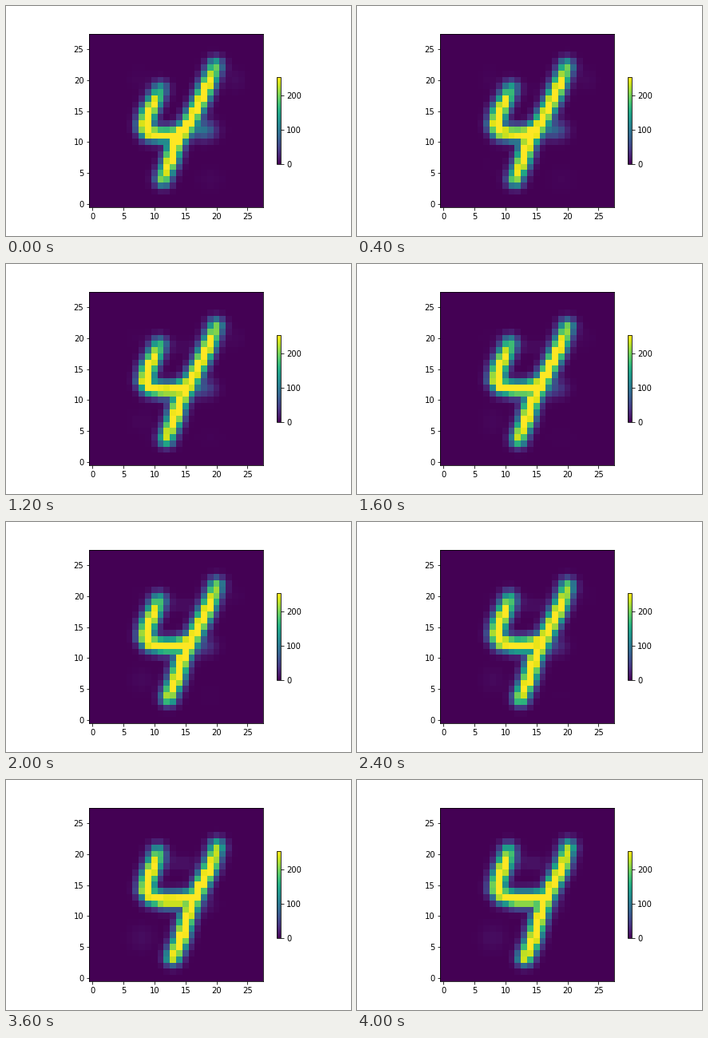
Write a matplotlib script that moves like this. It is 432x288 px and loops after 4.2 s.

```python
import numpy as np
import matplotlib.pyplot as plt
from matplotlib.animation import FuncAnimation

FRAMES = 21
SIZE = 28
PEAK = 254

# Each stroke: (x, y, strength) knots at the start and end of the morph.
STEM = (
    [(19.8, 22.2, .78), (18.7, 19.5, 1.1), (17.1, 16, 1.12), (15.3, 12.6, 1.15),
     (13.5, 10, 1.15), (12.6, 7, 1.12), (11.4, 4.1, .88)],
    [(20.1, 21, .88), (19.2, 18, 1.12), (17.9, 15.5, 1.15), (16.4, 12.6, 1.15),
     (15.4, 9.5, 1.15), (14.4, 6, 1.15), (13.2, 3.3, 1)],
)
HOOK = (
    [(10.8, 18.2, .55), (10.1, 16.7, 1), (9, 14.6, 1.12), (8.5, 12.6, 1.15),
     (9.1, 11.5, 1.1), (11.3, 11.1, 1), (13.4, 11.2, 1.1), (15.2, 12.4, 1.1)],
    [(10.5, 20.4, .8), (9.8, 18.2, 1.12), (9, 16.2, 1.15), (8.7, 14.4, 1.12),
     (9.5, 13.3, 1.08), (11.6, 12.7, 1.1), (14, 12.7, 1.1), (16.2, 13, 1.1)],
)
# Faint clouds: x, y, x spread, y spread, strength at start and end.
CLOUDS = [
    (18, 11.9, 1.9, 1.5, 95, 8),
    (11.2, 18.8, 1.2, 1.2, 45, 35),
    (23, 20, 1.6, 1.8, 8, 0),
    (7.5, 20, 2, 2, 4, 0),
    (8, 6.5, 2.2, 2.2, 0, 9),
    (14.5, 18.5, 2.2, 1.2, 0, 14),
    (19, 4, 2.5, 2, 4, 0),
]

cols, rows = np.meshgrid(np.arange(SIZE), np.arange(SIZE))


def stroke(knots, t, width):
    start, end = np.array(knots)
    path = start + (end - start) * t
    knot_at = np.arange(len(path))
    fine = np.linspace(0, len(path) - 1, 120)
    x, y, strength = (np.interp(fine, knot_at, p) for p in path.T)
    d2 = (cols[..., None] - x) ** 2 + (rows[..., None] - y) ** 2
    return 255 * (strength * np.exp(-d2 / width ** 2)).max(axis=-1)


def digit(t):
    ink = np.maximum(stroke(STEM, t, 1.28), stroke(HOOK, t, 1.3))
    haze = 0
    for x, y, sx, sy, a, b in CLOUDS:
        cloud = np.exp(-((cols - x) / sx) ** 2 - ((rows - y) / sy) ** 2)
        haze = haze + (a + (b - a) * t ** .7) * cloud
    return np.clip(ink + haze * (1 - np.clip(ink / 255, 0, 1)), 0, PEAK)


plt.rcParams.update({"font.family": "DejaVu Sans", "font.size": 10,
                     "figure.subplot.bottom": .125})
fig, ax = plt.subplots(figsize=(6, 4), dpi=72)
image = ax.imshow(digit(0), origin="lower", cmap="viridis", vmin=0, vmax=PEAK,
                  interpolation="nearest")
ax.set_xticks(range(0, SIZE, 5))
ax.set_yticks(range(0, SIZE, 5))
fig.colorbar(image, shrink=.5, ticks=[0, 100, 200])


def update(frame):
    image.set_data(digit(frame / (FRAMES - 1)))
    return [image]


anim = FuncAnimation(fig, update, frames=FRAMES, interval=200, repeat=True,
                     repeat_delay=0)
plt.show()
```
